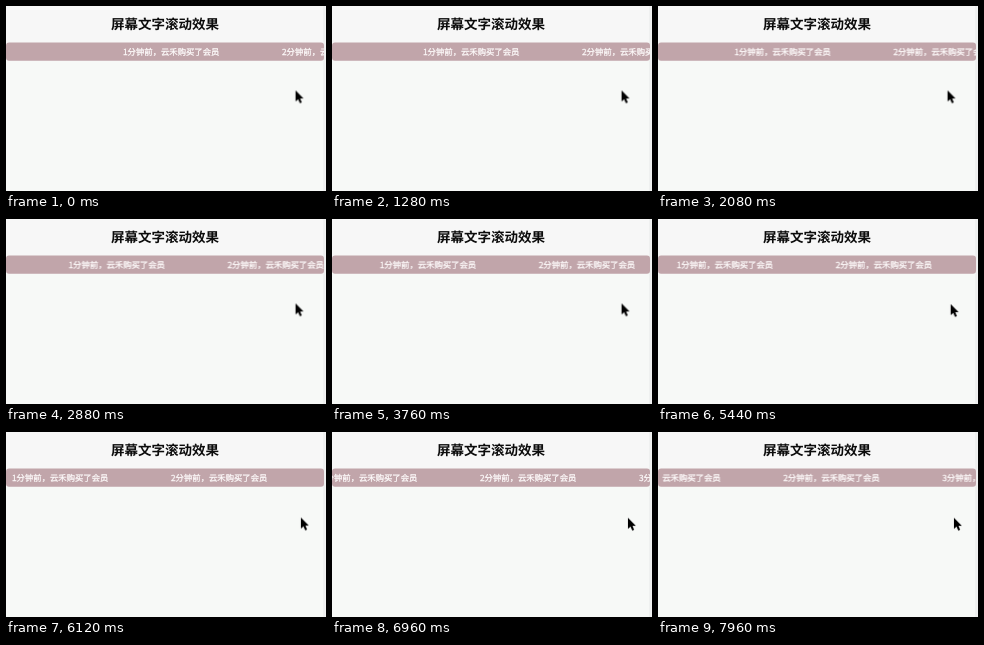
An HTML page that plays this animation: 320 by 185 pixels, repeating every 8000 ms.

```html
<!DOCTYPE html>
<html lang="zh-CN">
<head>
<meta charset="utf-8">
<title>屏幕文字滚动效果</title>
<style>
  html, body { margin: 0; width: 100%; height: 100%; overflow: hidden; background: #f7f9f7; }
  svg { display: block; width: 320px; height: 185px; }
  text { font-family: "Noto Sans CJK SC", "Noto Sans CJK", sans-serif; text-rendering: geometricPrecision; }
  .title { font-size: 13.5px; font-weight: 700; text-anchor: middle; fill: #0c0c0c; }
  .item { font-size: 8.35px; fill: #fdfafa; stroke: #fdfafa; stroke-width: .3px; }

  /* The ticker slows slightly in the middle and speeds up towards the end. */
  #track { animation: scroll 8s cubic-bezier(.333, .384, .667, .573) infinite; }
  @keyframes scroll {
    from { transform: translateX(117.6px); }
    to { transform: translateX(-34px); }
  }

  #cursor { animation: drift 8s infinite; filter: drop-shadow(0 .6px .5px #0004); }
  @keyframes drift {
    from, 59% { transform: translate(289.6px, 84.4px); animation-timing-function: ease-out; }
    86%, to { transform: translate(296px, 85.8px); }
  }
</style>
</head>
<body>
<svg viewBox="0 0 320 185">
  <defs>
    <clipPath id="bar"><rect y="36.5" width="318" height="18.3" rx="3"/></clipPath>
  </defs>
  <rect width="318" height="37" fill="#f7f7f7"/>
  <rect x="318" width="2" height="185" fill="#f1f2f2"/>
  <rect x="317.6" width=".6" height="185" fill="#e4e5e5"/>
  <text class="title" x="159" y="22.9">屏幕文字滚动效果</text>
  <g clip-path="url(#bar)">
    <rect y="36" width="318" height="20" fill="#c1a5aa"/>
    <g id="track"></g>
  </g>
  <path id="cursor" d="M0 0V11L2.5 8.7L4.3 12.7L6.1 11.9L4.5 8H7.8Z"
        fill="#000" stroke="#fff" stroke-width=".8" stroke-linejoin="round" paint-order="stroke"/>
</svg>
<script>
const ITEM_GAP = 159;
const track = document.getElementById('track');

for (let i = 0; i < 3; i++) {
  const item = document.createElementNS('http://www.w3.org/2000/svg', 'text');
  item.setAttribute('class', 'item');
  item.setAttribute('x', i * ITEM_GAP - 0.6);
  item.setAttribute('y', 49.1);
  item.textContent = `${i + 1}分钟前，云禾购买了会员`;
  track.append(item);
}
</script>
</body>
</html>
```
